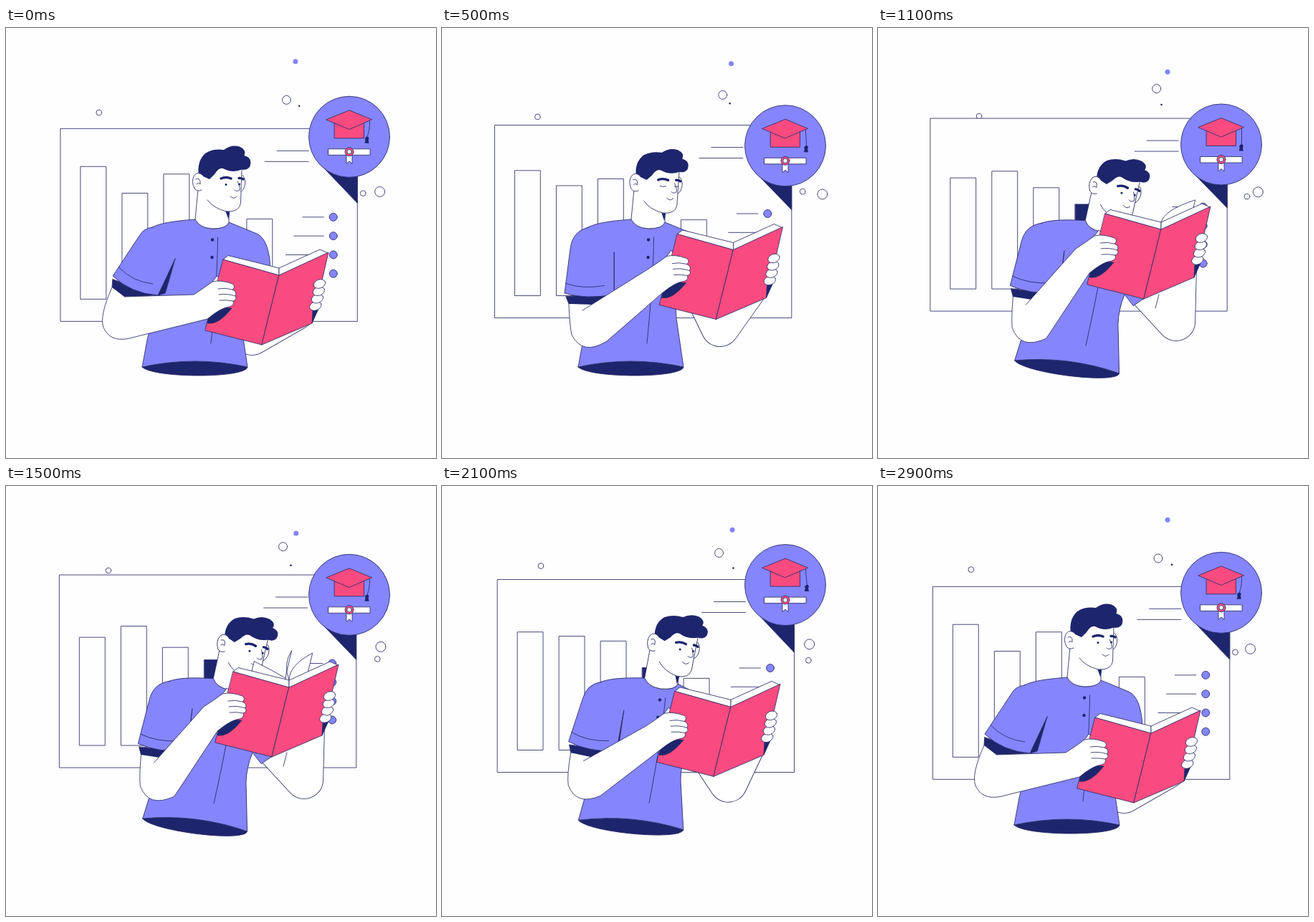
Animation of 600x600 px, one loop 3000 ms. Source, as an HTML page with a canvas:

```html
<!DOCTYPE html>
<html lang="en">
<head>
<meta charset="utf-8">
<title>Student reading</title>
<style>
html, body { margin: 0; width: 100%; height: 100%; overflow: hidden; background: #fefdff; }
canvas { display: block; width: 600px; height: 600px; }
</style>
</head>
<body>
<canvas id="stage"></canvas>
<script>
const LOOP = 3000, STEP = 100;
const BG = '#fefdff', WHITE = '#fff', DARK = '#1d256d', BLUE = '#8585fd', PINK = '#fa4b80', LINE = '#2a2e66';

const canvas = document.getElementById('stage');
const ctx = canvas.getContext('2d');
const ratio = window.devicePixelRatio || 1;
canvas.width = canvas.height = 600 * ratio;

// Motion rules
const ease = u => { u = Math.min(1, Math.max(0, u)); return u * u * (3 - 2 * u); };
// Eases up between a and b, back down between c and d.
const pulse = (t, a, b, c, d) => ease((t - a) / (b - a)) - ease((t - c) / (d - c));
// Floats around a centre, highest at the time "peak".
const wave = (t, mid, amp, peak, period = LOOP) => mid + amp * Math.cos(2 * Math.PI * (t - peak) / period);
const mix = (a, b, u) => a.map((x, i) => x + (b[i] - x) * u);

function pose(t) {
  const raise = pulse(t, 50, 500, 1900, 2580);
  const lean = pulse(t, 500, 1100, 1800, 2700);
  const pull = pulse(t, 500, 1050, 1750, 2300);
  return {
    raise, lean,
    nod: pulse(t, 200, 800, 2350, 2850),
    shut: Math.abs(t - 500) < 150 || Math.abs(t - 2400) < 150,
    tilt: lean * 7 * Math.PI / 180,
    book: [25.5 * raise + 12 * lean - 23.5 * pull, -35.5 * raise - 28.5 * pull]
  };
}

// Drawing helpers
function path(d, fill, stroke = LINE, width = .85) {
  const p = new Path2D(d);
  if (fill) { ctx.fillStyle = fill; ctx.fill(p); }
  if (stroke) { ctx.strokeStyle = stroke; ctx.lineWidth = width; ctx.stroke(p); }
}
function oval(x, y, rx, ry, fill, stroke = LINE, turn = 0) {
  ctx.beginPath();
  ctx.ellipse(x, y, rx, ry, turn, 0, Math.PI * 2);
  if (fill) { ctx.fillStyle = fill; ctx.fill(); }
  if (stroke) { ctx.strokeStyle = stroke; ctx.lineWidth = .85; ctx.stroke(); }
}
const dot = (x, y, r, fill, stroke) => oval(x, y, r, r, fill, stroke);
const box = (x, y, w, h, fill) => path(`M${x} ${y}h${w}v${h}h${-w}Z`, fill);
function group([x, y], draw, turn = 0) {
  ctx.save();
  ctx.translate(x, y);
  ctx.rotate(turn);
  draw();
  ctx.restore();
}

function drawBubbles(t) {
  dot(wave(t, 404.3, .8, 2000), wave(t, 56.3, 9.8, 1600), 3.5, BLUE, null);
  dot(wave(t, 389, 3, 300), wave(t, 92.5, 8.6, 2800), 6, BG);
  dot(wave(t, 403.3, 7.8, 2650), wave(t, 109.8, 4.8, 2150), 1.3, DARK, null);
  dot(wave(t, 136.3, 6.6, 1470), wave(t, 118, 6.8, 750), 3.8, BG);
}
function drawSideBubbles(t) {
  dot(wave(t, 522.3, 10.3, 780), wave(t, 226.4, 5.6, 570), 7, BG);
  dot(wave(t, 508.2, 10, 1500), wave(t, 236, 8, 1900), 3.8, BG);
}

const boardX = t => wave(t, -1.5, 2.5, 2400);

function drawBoard(t) {
  box(77, 140, 414, 269, BG);
  const swing = wave(t, 0, 1, 2940);
  const bar = (slot, mid, amp, width = 35.5, fill = BG) => {
    const h = mid + amp * swing;
    box(105 + 58 * slot, 378 - h, width, h, fill);
  };
  bar(0, 168, 17.2);
  bar(1, 157.2, -9.4);
  bar(2, 155.7, 19);
  bar(3, 114, -5.5, 30, DARK);
  bar(4, 102, 10);
  path('M379 171H423M362 186H423');
  for (let i = 0; i < 4; i++) {
    const y = 263.5 + 26.3 * i;
    path(`M${414.5 - 11.7 * (i % 3)} ${y}H444`);
    dot(457.5, y, 5.5, BLUE);
  }
}

function drawBadge(t) {
  const y = wave(t, 151.8, 14.4, 750), dx = boardX(t);
  path(`M442 ${y + 42}L${491 + dx} ${y + 93.5 + 1.3 * dx}V${y + 45}Z`, DARK);
  group([479, y], () => {
    dot(0, 0, 56.5, BLUE);
    box(-20.5, -20, 41, 22, PINK);
    path('M-32 -24L0 -37L31.5 -24L0 -10.5Z', PINK);
    const s = wave(t, -.5, 3, 750, LOOP / 2);
    path(`M28.5 -22Q29 -10 ${28.5 + s} 0`);
    path(`M${27 + s} 0h3l1 3l-1 1l1 5h-6l1 -5l-1 -1Z`, DARK, null);
    path('M-4 22V37.5L0 34L4 37.5V22Z', WHITE);
    box(-29, 17, 58, 8.5, WHITE);
    dot(0, 21, 6, PINK);
    dot(0, 21, 3.2, WHITE);
  });
}

// The body is drawn upright and tilted about the waist.
const WAIST = [264, 474];
const inBody = (p, draw) => group(WAIST, () => {
  ctx.translate(-WAIST[0], -WAIST[1]);
  draw();
}, p.tilt);
function tilted([x, y], angle) {
  const dx = x - WAIST[0], dy = y - WAIST[1], c = Math.cos(angle), s = Math.sin(angle);
  return [WAIST[0] + dx * c - dy * s, WAIST[1] + dx * s + dy * c];
}

function drawTorso() {
  path('M190 473Q264 457 337 473C335 489 205 489 190 473Z', DARK);
  path('M264 267C240 269 215 271 200 280L212 374L197 435L190 473Q264 457 337 473L327 405Q325 385 331 363L345 377L370 355L369 335Q367 295 350 287L311 271Q308 280 288 280Q270 279 264 267Z', BLUE);
  path('M268 225L264 267Q270 279 288 280Q308 280 311 271V245', WHITE);
  path('M295.5 292Q295 350 286 440');
  dot(288, 295.5, 2.2, DARK, null);
  dot(287.5, 320, 2.2, DARK, null);
}

function drawHead(p) {
  group([267 + 3 * p.nod, 215 + 1.5 * p.nod], () => {
    ctx.translate(-267, -215);
    path('M306 255L312.5 254L310.5 267Z', DARK, null);
    path('M330 205Q336 212 332.5 222Q331 227 327 229', WHITE);
    path('M271 195L269 227L281 240Q290 252 308 256Q326 257 327.5 244Q328 222 329 195Z', WHITE, null);
    path('M281 240Q290 252 308 256Q326 257 327.5 244Q328 222 329 197');
    // Hair flattens a little as the head nods.
    ctx.save();
    ctx.translate(0, 205);
    ctx.scale(1, 1 - .1 * p.nod);
    ctx.translate(0, -205);
    path('M269 206Q266 186 278 175Q289 168 304 170Q314 162 326 165.5Q336 170 332.5 178Q344 181 340.5 193Q337 199 329 197.5Q316 203 303 196Q297 194 291 204L284 211L275 207Z', DARK, null);
    ctx.restore();
    path('M275 206Q268 199 262.5 206Q258 214 263 224Q267 229 273 226', WHITE);
    path('M265 211Q272 208 271 218Q268 215 266 218');
    path('M300 210Q307 207 314 210M325 209.5Q328 209 331 211', null, DARK, 3.4);
    if (p.shut) path('M303 218.5Q307 220.5 311 218.5M323 218Q325.5 220 328 218');
    else {
      dot(307, 218.5, 1.5, DARK, null);
      dot(325.5, 218, 1.5, DARK, null);
    }
    path('M323 214Q327 222 326 226Q322 229 319 226M313 235Q318 240 322 235');
  }, p.nod * .07);
}

// Far arm: one thick bent limb from shoulder over elbow to the hand.
function drawFarArm({ raise, lean, book }) {
  const shoulder = [340 + 20 * raise + 10 * lean, 360];
  const elbow = [343 + 45 * raise + 28 * lean, 430 - 12 * raise - 8 * lean];
  const limb = `M${shoulder}L${elbow}L${404 + book[0]} ${395 + book[1]}`;
  path(limb, null, LINE, 54);
  path(limb, null, WHITE, 52.3);
  path(`M${elbow[0] - 24} ${elbow[1] - 38}l-5 19`);
}

// Joints of the near arm, hanging low or raised.
function nearJoints(raise) {
  const at = (low, high) => mix(low, high, raise);
  return {
    top: at([192, 279], [182, 283]),
    shoulder: at([186, 290], [179, 308]),
    tip: at([149, 346], [171, 370]),
    hem: at([174, 370], [200, 379]),
    pit: at([212, 373], [240, 372]),
    fold: at([236, 322], [240, 313]),
    cuff: at([148, 362], [177, 385]),
    cuffEnd: at([165, 375], [209, 386]),
    crease: at([165, 375], [196, 394]),
    under: at([170, 433.5], [230, 437]),
    bend: at([145, 438], [196, 458]),
    elbow: at([136, 418], [181, 428]),
    back: at([130, 402], [178, 415])
  };
}

function drawSleeve(j, raise) {
  path(`M${j.fold}L${j.pit}l${10 * (1 - raise)} -3Z`, DARK);
  path(`M${mix(j.tip, j.cuff, .3)}L${j.cuff}L${j.cuffEnd}L${j.pit}Z`, DARK);
  path(`M205 278Q${j.top} ${j.shoulder}L${j.tip}Q${j.hem} ${j.pit}L${j.fold}`, BLUE);
  const from = mix(j.tip, j.shoulder, .22), to = mix(j.pit, j.fold, .2);
  path(`M${from}Q${mix(j.hem, j.shoulder, .2)} ${mix(to, from, .2)}`);
}

// Hand outline in book coordinates, joined to the forearm.
const HAND = [
  [262, 372], [276, 363], [288, 354], [300, 351], [316, 357], [321, 361], [316, 365], [323, 368], [320, 374],
  [323, 379], [317, 381], [319, 387], [312, 389], [300, 390], [281, 406]
];

function drawNearArm(joints, { tilt, book }) {
  const j = {};
  for (const name in joints) j[name] = tilted(joints[name], tilt);
  const hand = HAND.map(([x, y]) => [x + book[0], y + book[1]]);
  let d = `M${j.crease}L${hand[0]}`;
  for (let i = 1; i < hand.length; i += 2) d += `Q${hand[i]} ${hand[i + 1]}`;
  path(`M${j.cuff}L${j.cuffEnd}L${j.crease}Z`, WHITE, null);
  path(`${d}L${j.under}Q${j.bend} ${j.elbow}Q${j.back} ${j.cuff}`, WHITE);
  group(book, () => path('M316 365Q306 362 296 364M320 374Q308 370 297 372M317 381Q308 379 298 380'));
}

// A page turning from the right half (u = 0) to the left half (u = 1).
function drawLeaf(u) {
  if (u <= 0 || u >= 1) return;
  const x = 56 - 82 * u - 45 * u * u;
  const y = -26 + 9 * u - 20 * Math.sin(Math.PI * u);
  path(`M0 0Q${.3 * x - 10} ${.55 * y} ${x} ${y}L${x - 8} ${y + 33}L-8 33Z`, WHITE);
}

function drawBook(t) {
  group([381, 335], () => {
    for (let i = 0; i < 3; i++) drawLeaf((t - 1050 - 130 * i) / (520 + 120 * i));
  });
  path('M303 323L310 317.5L381 335V345Z', WHITE);
  path('M381 345V335L438 309L449 314Z', WHITE);
  path('M274 366Q288 356 294 346L299 350L298 358Z', WHITE);
  path('M303 323L381 345L357 442L278 422Z', PINK);
  path('M381 345L450 313L427 412L357 442Z', PINK);
  path('M428 394L427 412L436 392Z', DARK);
  for (let i = 3; i >= 0; i--) {
    oval(437.5 - .7 * i - .4 * i * i, 357 + 10.3 * i, 8.4, 6, WHITE, LINE, -.35);
  }
  path('M284 398L281 412Q296 415 315 391L298 390Z', DARK);
}

function drawFigure(t) {
  const p = pose(t), joints = nearJoints(p.raise);
  drawFarArm(p);
  inBody(p, () => {
    drawTorso();
    drawHead(p);
    drawSleeve(joints, p.raise);
  });
  group(p.book, () => drawBook(t));
  drawNearArm(joints, p);
}

function draw(t) {
  ctx.setTransform(ratio, 0, 0, ratio, 0, 0);
  ctx.lineCap = ctx.lineJoin = 'round';
  ctx.fillStyle = BG;
  ctx.fillRect(0, 0, 600, 600);
  drawBubbles(t);
  group([boardX(t), wave(t, -7.8, 8.2, 2950)], () => drawBoard(t));
  drawBadge(t);
  drawSideBubbles(t);
  drawFigure(t);
}

const begin = performance.now();
function tick() {
  const t = (performance.now() - begin) % LOOP;
  draw(Math.floor(t / STEP) * STEP);
  requestAnimationFrame(tick);
}
tick();
</script>
</body>
</html>
```
